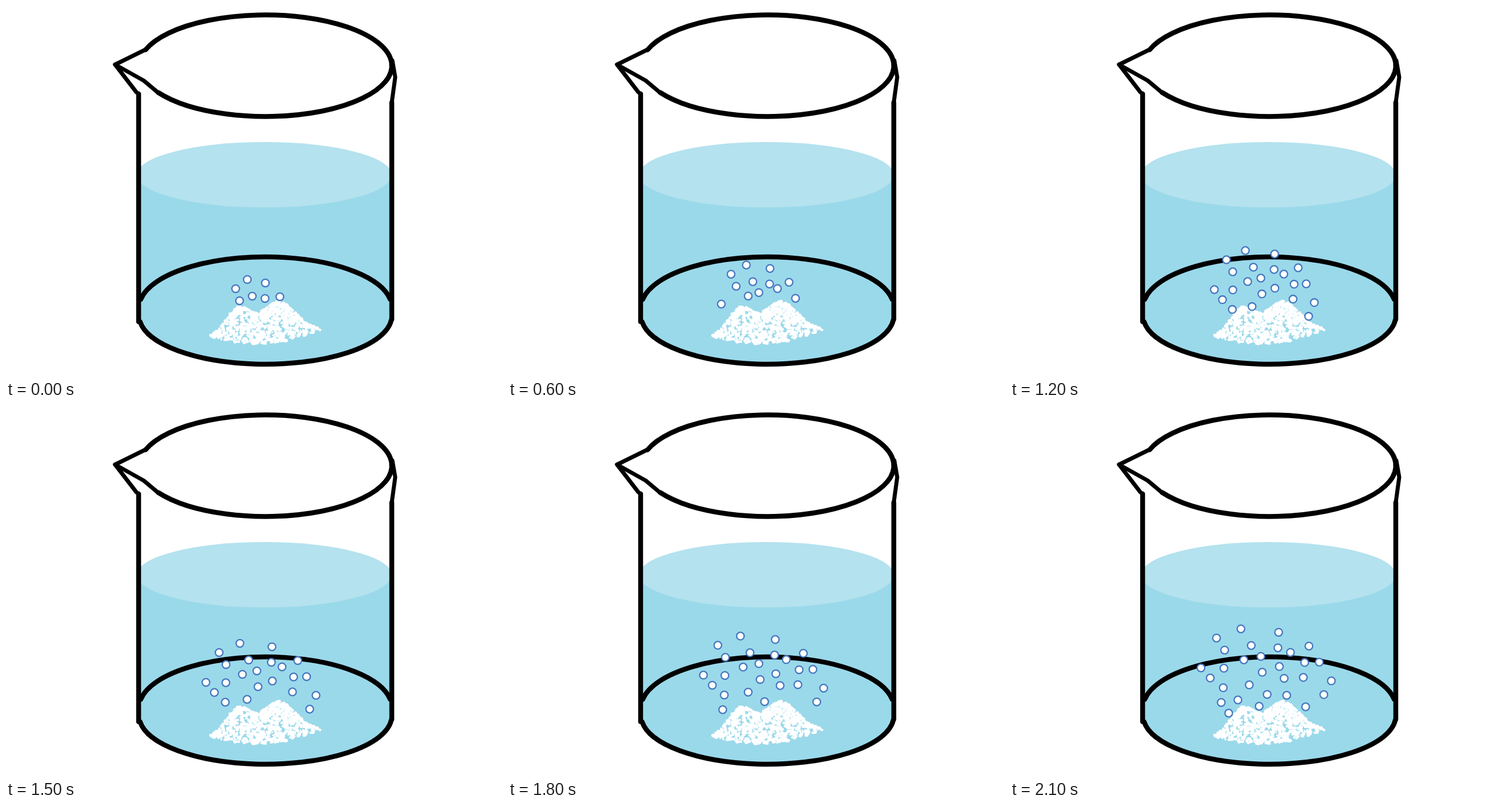
Write an HTML page with a canvas that moves like this. It is 864x648 px and loops after 2.25 s.

```html
<!DOCTYPE html>
<html lang="en">
<head>
<meta charset="utf-8">
<title>Beaker</title>
<style>
html, body { margin: 0; width: 100%; height: 100%; overflow: hidden; background: #fff; }
canvas { display: block; }
</style>
</head>
<body>
<canvas id="stage" width="864" height="648"></canvas>
<script>
const STEP = 150, LOOP = 2250;
const RISE = 0.042, SPREAD = 0.00032, MIDDLE = 437;
const ctx = document.getElementById('stage').getContext('2d');
const scene = document.createElement('canvas');
scene.width = 864;
scene.height = 648;
const g = scene.getContext('2d');

function line(d, width = 8.5) {
  g.lineWidth = width;
  g.stroke(new Path2D(d));
}

function arc(y, ry, from, to) {
  g.lineWidth = 8.5;
  g.beginPath();
  g.ellipse(452, y, 220, ry, 0, from, to);
  g.stroke();
}

function oval(c, x, y, rx, ry, fill) {
  c.beginPath();
  c.ellipse(x, y, rx, ry, 0, 0, 2 * Math.PI);
  c.fillStyle = fill;
  c.fill();
}

function drawWater() {
  g.save();
  g.beginPath();
  g.rect(234, 230, 434, 400);
  g.clip();
  g.fillStyle = '#9ad9ea';
  g.fillRect(234, 294, 434, 246);
  oval(g, 452, 540, 220, 84, '#9ad9ea');
  oval(g, 450, 294, 222, 57, '#b4e2ee');
  g.restore();
}

function drawGlass() {
  const PI = Math.PI;
  g.strokeStyle = '#000';
  g.lineJoin = g.lineCap = 'round';
  arc(104, 88.5, PI + 0.318, 3 * PI - 0.555);
  line('M243 76L190 102L240 130L265 151', 7);
  line('M190 102L227 150L231 153', 7);
  line('M231 153V550');
  line('M673 95L678 124L672 168', 7);
  line('M672 168V546');
  arc(525, 88, PI + 0.16, 2 * PI - 0.16);
  arc(540, 84, 0.08, PI - 0.12);
}

// A heap with two humps, loose grains towards the bottom
function drawPowder() {
  const hump = (x, mid, width) => Math.exp(-(((x - mid) / width) ** 2));
  let seed = 11;
  const rnd = () => (seed = seed * 16807 % 2147483647) / 2147483647;
  for (let n = 0; n < 1500; n++) {
    const u = rnd(), x = 357 + 193 * u, base = 574 - 13.5 * u;
    const top = base + 2 - 46 * hump(x, 405, 30) - 53 * hump(x, 475, 40);
    const height = base + 3 + 18 * Math.sin(Math.PI * u) - top;
    const y = top + height * rnd() ** 1.5, r = 1.4 + 1.8 * rnd();
    if (rnd() * 68 < height) oval(g, x, y, r, r, '#fff');
  }
}

const bubbles = [];
// Points say where the bubbles are at the given time
function spawn(birth, time, ...points) {
  for (const [x, y] of points) bubbles.push({ birth, time, x, y });
}
spawn(0, 1200, [410, 426], [461, 432], [377, 442], [424, 455], [460, 459], [502, 456], [388, 463]);
spawn(300, 1200, [437, 474], [477, 467], [516, 484], [414, 480], [356, 494]);
spawn(750, 1500, [363, 499], [383, 482], [439, 489], [464, 479], [501, 472], [540, 504]);
spawn(1050, 1500, [499, 498], [382, 516], [420, 511], [529, 528]);
spawn(1650, 1800, [474, 487], [447, 515], [374, 529]);
spawn(1950, 2100, [482, 504], [397, 512], [434, 523], [515, 524], [381, 535]);

g.fillStyle = '#fff';
g.fillRect(0, 0, 864, 648);
drawWater();
drawGlass();
drawPowder();

// Bubbles rise steadily and drift away from the middle
function draw(now) {
  const t = Math.floor(now % LOOP / STEP) * STEP;
  ctx.drawImage(scene, 0, 0);
  ctx.strokeStyle = '#4677bf';
  ctx.lineWidth = 2.3;
  for (const b of bubbles) {
    if (t < b.birth) continue;
    const dt = t - b.time;
    oval(ctx, b.x + (b.x - MIDDLE) * SPREAD * dt, b.y - RISE * dt, 6.6, 6.6, '#fff');
    ctx.stroke();
  }
}

const start = performance.now();
function tick() {
  draw(performance.now() - start);
  requestAnimationFrame(tick);
}
tick();
</script>
</body>
</html>
```
